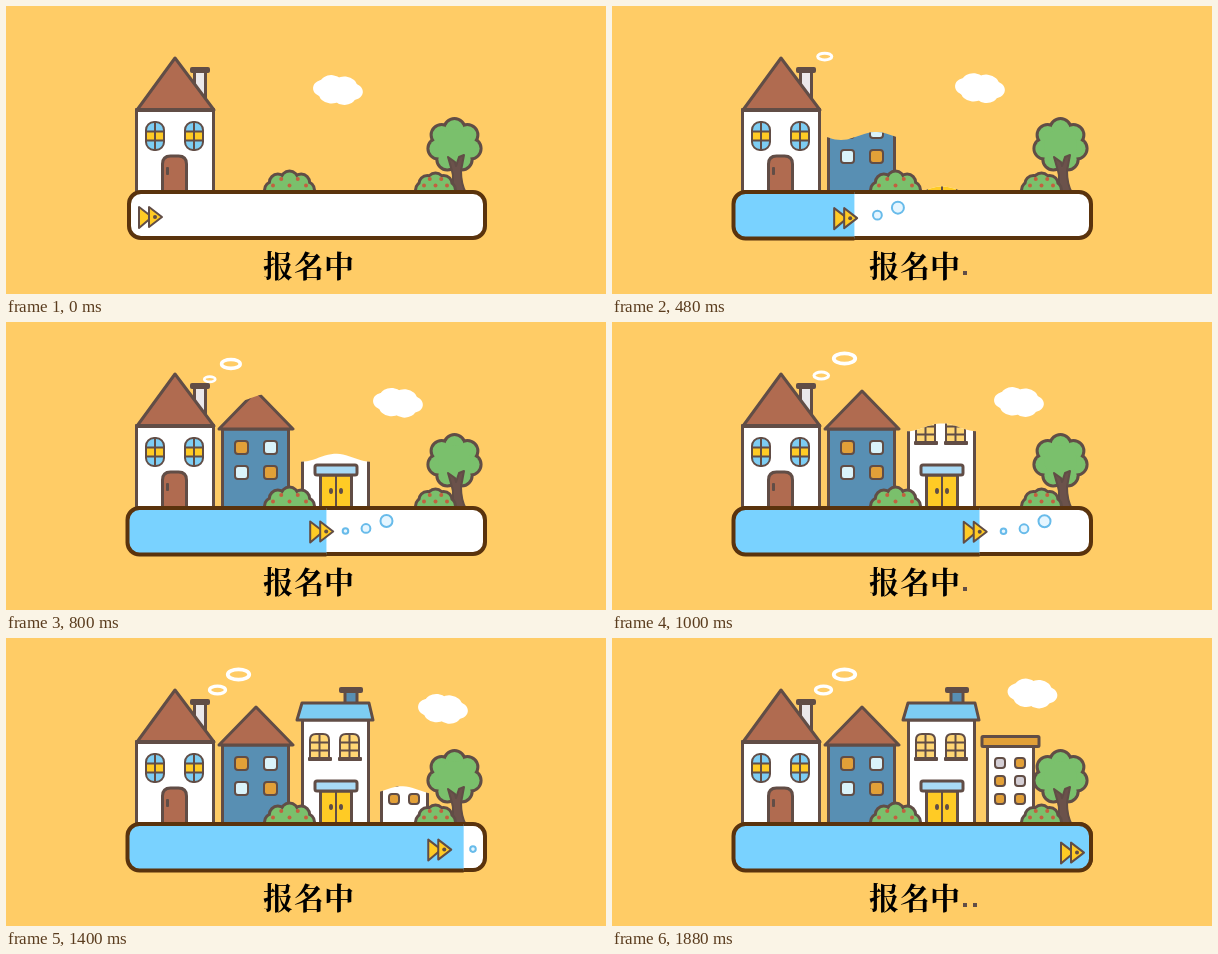
An HTML page that plays this animation: 600 px wide and 288 px high, repeating every 1920 ms.

```html
<!DOCTYPE html>
<html lang="zh">
<head>
<meta charset="utf-8">
<title>报名中</title>
<style>
  html, body { margin: 0; width: 100%; height: 100%; overflow: hidden; background: #ffcc66; }
  svg { display: block; width: 600px; height: 288px; }
  .line { stroke: #614d46; stroke-width: 3; stroke-linejoin: round; stroke-linecap: round; }
  .thin { stroke-width: 2; }
  .thick { stroke-width: 6; }
  .dark { fill: #614d46; }
  .label { font: 600 30px KaiTi, "AR PL UKai CN", "Noto Serif CJK SC", "Noto Sans CJK SC", "Noto Sans CJK", serif; }
</style>
</head>
<body>
<svg viewBox="0 0 600 288" id="stage"></svg>
<script>
const LOOP = 1920, STEP = 40, TRIP = 1880;
const C = {
  roof: '#b06b50', blue: '#588fb3', sky: '#7dcdf3', yellow: '#ffcb25', orange: '#e2a038',
  pale: '#daf3fa', grey: '#d3ced5', green: '#7ac06c', berry: '#c2603f',
  water: '#79d2ff', edge: '#5a330d'
};

const repeat = (n, make) => Array.from({ length: n }, (_, i) => make(i)).join('');
const box = (x, y, w, h, fill, rx = 0, cls = 'line') =>
  `<rect x="${x}" y="${y}" width="${w}" height="${h}" rx="${rx}" fill="${fill}" class="${cls}"/>`;
const pane = (x, y, size, fill) => box(x, y, size, size, fill, 3, 'line thin');
const slab = (x, y, w, h, rx = 1) => box(x, y, w, h, '#614d46', rx, '');
const path = (d, fill, cls = 'line') => `<path d="${d}" fill="${fill}" class="${cls}"/>`;
const oval = (x, y, rx, ry, fill, cls = '') =>
  `<ellipse cx="${x}" cy="${y}" rx="${rx}" ry="${ry}" fill="${fill}" class="${cls}"/>`;

// Round lobes set along an elliptic arc, merged into one outlined shape
function foliage(cx, cy, rx, ry, r, n, from, turn) {
  const lobes = cls => repeat(n, i => {
    const a = from + turn * i;
    return oval(cx + rx * Math.cos(a), cy + ry * Math.sin(a), r, r, C.green, cls);
  });
  return lobes('line thick') + lobes('') + oval(cx, cy, rx, ry, C.green);
}

function bush(cx, rx, ry) {
  return foliage(cx, 184, rx, ry, 7, 5, Math.PI, Math.PI / 4) +
    repeat(5, i => oval(cx + (i - 2) * rx * 0.5, i % 2 ? 173 : 179.5, 2, 2, C.berry));
}

function ovalWindow(x) {
  return box(x, 116, 18, 28, C.sky, 8, 'line thin') +
    box(x + 1, 126, 16, 8, C.yellow, 0, '') +
    path(`M${x} 125.5h18M${x} 134.5h18M${x + 9} 116v28`, 'none', 'line thin');
}

function archWindow(x) {
  return path(`M${x} 120v-18q0-6 6-6h7q6 0 6 6v18z`, '#ffd674', 'line thin') +
    path(`M${x + 9.5} 96v24M${x} 104.5h19M${x} 112.5h19`, 'none', 'line thin') +
    slab(x - 2, 119, 24, 4);
}

const whiteHouse =
  box(188.5, 65, 11, 34, '#ebe8ea') + slab(184, 61, 20, 6, 2) +
  box(130.5, 104, 77, 82, '#fff') +
  path('M131 104L169 52L208 104z', C.roof) + slab(129, 102, 80, 4) +
  ovalWindow(140) + ovalWindow(179) +
  path('M156.5 187v-29q0-8 8-8h8q8 0 8 8v29z', C.roof) + slab(160, 161, 3, 8);

const blueHouse =
  box(216.5, 107, 66, 80, C.blue) +
  path('M213 107L250 69L287 107z', C.roof) +
  repeat(4, i => {
    const col = i % 2, row = i >> 1;
    return pane(229 + 29 * col, 119 + 25 * row, 13, col === row ? (col ? C.orange : C.orange) : C.pale);
  });

const shop =
  box(339, 53, 12, 14, C.blue) + slab(333, 49, 24, 6, 2) +
  box(296.5, 82, 66, 105, '#fff') +
  path('M296 65H363L367 82H291z', C.sky) +
  archWindow(304) + archWindow(334) +
  box(314.5, 153, 31, 34, C.yellow) +
  path('M330 153v33', 'none', 'line thin') +
  oval(325, 169, 2, 3, '#614d46') + oval(335, 169, 2, 3, '#614d46') +
  box(309, 143, 42, 10, '#a9daf5', 2);

const block =
  box(375.5, 108, 46, 79, '#fff') + box(370, 98.5, 57, 10, C.orange, 1) +
  repeat(6, i => pane(383 + 20 * (i % 2), 120 + 18 * (i >> 1), 10, i % 3 ? C.orange : C.grey));

const tree =
  foliage(448.5, 139, 16.5, 16, 9, 7, -Math.PI / 2, Math.PI * 2 / 7) +
  path('M444 187q5-14 2-22l-4-14 7 5 1 4 3-9 5-2-3 16q0 13 5 22z', '#6b524b', 'line thin');

const cloud = repeat(6, i => {
  const a = i * Math.PI / 3;
  return oval(13 * Math.cos(a), 6 * Math.sin(a), 12, 9, '#fff');
});

const ring = id => `<ellipse id="${id}" fill="none" stroke="#fff"/>`;
const rising = (art, i) =>
  `<clipPath id="clip${i}"><path id="wave${i}"/></clipPath><g clip-path="url(#clip${i})">${art}</g>`;

document.getElementById('stage').innerHTML = `
  <g id="cloud">${cloud}</g>
  ${ring('bigRing')}${ring('smallRing')}
  ${whiteHouse}
  ${[blueHouse, shop, block].map(rising).join('')}
  ${tree}${bush(283.5, 16.5, 10.5)}${bush(429.5, 11.5, 8.5)}
  <rect x="123" y="186" width="356" height="46" rx="12" fill="#fff" stroke="${C.edge}" stroke-width="4"/>
  <clipPath id="fillClip"><rect id="fill" x="119" y="180" height="60"/></clipPath>
  <rect x="121.5" y="186" width="357.5" height="46.5" rx="12" fill="${C.water}" stroke="${C.edge}" stroke-width="4" clip-path="url(#fillClip)"/>
  ${repeat(3, i => `<circle id="bubble${i}" r="${2.8 + 1.6 * i}" fill="#e6f6ff" stroke="#68bbea" stroke-width="2"/>`)}
  <g id="fish">
    ${path('M1-10V11L14 0z', C.yellow, 'line thin')}${path('M11-10V10L24 0z', C.yellow, 'line thin')}
    ${oval(17, 0, 2, 2, '#614d46')}
  </g>
  <text class="label" y="271" x="257 288 318">报名中</text>
  ${repeat(2, i => `<rect id="dot${i}" x="${351 + 10 * i}" y="265" width="4" height="4" class="dark"/>`)}`;

const el = id => document.getElementById(id);
const set = (id, attrs) => { for (const k in attrs) el(id).setAttribute(k, attrs[k]); };
const show = (id, on) => set(id, { visibility: on ? 'visible' : 'hidden' });
const part = (t, from, to) => Math.min(1, Math.max(0, (t - from) / (to - from)));
const smooth = u => (1 - Math.cos(Math.PI * u)) / 2;

function drawFish(t) {
  const u = part(t, 0, TRIP);
  const x = 132 + 316 * (1 - (1 - u ** 1.5) ** 2.4);
  const y = 211 + t / 400 * Math.cos(Math.PI * (t - 1240) / 360);
  set('fish', { transform: `translate(${x} ${y})` });
  // The water slows down a little on its way
  set('fill', { width: 0.265 * t - 1.65e-5 * t * t });

  const lead = 70 * (1 - Math.exp(-t / 480));
  for (let i = 0; i < 3; i++) {
    const gap = lead + 20.5 * (i - 1);
    show('bubble' + i, gap > 25 && x + gap < 469);
    set('bubble' + i, { cx: x + gap, cy: y - 0.5 - 2.5 * i * i });
  }
}

function drawCloud(t) {
  // Drifts right, then turns back at the same speed
  const x = 446.7 - 0.075 * Math.abs(t - 1530);
  const y = 84 - 0.004 * t - 21 * smooth(part(t, 1150, 1760));
  set('cloud', { transform: `translate(${x} ${y}) rotate(6)` });
}

function drawRing(id, u, dx, dy, size) {
  const r = size * (0.37 + 0.63 * u);
  show(id, u > 0);
  set(id, { cx: 196 + dx * u, cy: 62.5 - dy * u, rx: r, ry: r * 0.48, 'stroke-width': 1.5 + r * 0.22 });
}

function drawWave(i, t, start, speed) {
  const left = 208 + 78 * i, peak = 264 + 66 * i;
  const level = 192 - speed * Math.max(0, t - start);
  let d = `M${left} 188`;
  for (let x = left; x <= left + 90; x += 3) {
    d += `L${x} ${level - 4 * Math.cos(Math.PI * (x - peak) / 35)}`;
  }
  set('wave' + i, { d: d + 'V188z' });
}

function draw(t) {
  drawFish(t);
  drawCloud(t);
  drawRing('bigRing', part(t, 40, 1000), 36.5, 26, 10.7);
  drawRing('smallRing', part(t, 520, 1080), 15.5, 10.5, 8);
  drawWave(0, t, 115, 0.17);
  drawWave(1, t, 430, 0.152);
  drawWave(2, t, 1140, 0.153);

  const dots = t < 400 ? 0 : (Math.floor(t / 200) + 2) % 3;
  for (let i = 0; i < 2; i++) show('dot' + i, dots > i);
}

const start = performance.now();
function tick() {
  const t = (performance.now() - start + 8) % LOOP;
  draw(Math.floor(t / STEP) * STEP);
  requestAnimationFrame(tick);
}
tick();
</script>
</body>
</html>
```
